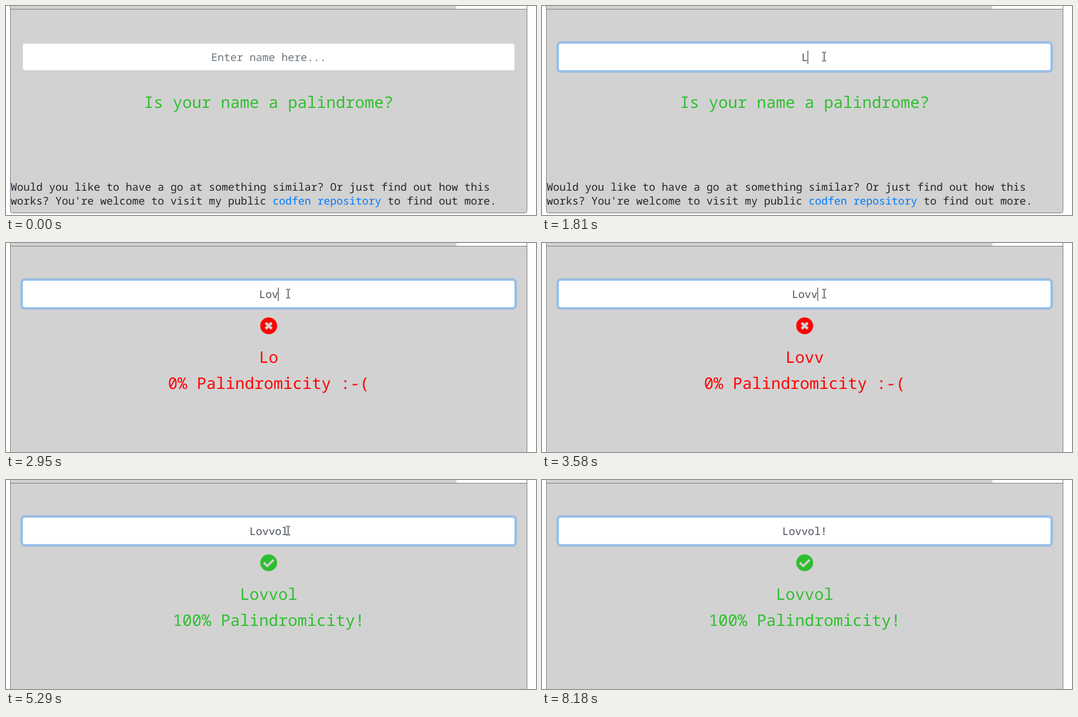
Write an HTML page that moves like this. It is 912 by 361 pixels and loops after 8250 ms.

```html
<!DOCTYPE html>
<html lang="en">
<head>
<meta charset="utf-8">
<title>Palindrome checker</title>
<style>
  html, body { margin: 0; width: 100%; height: 100%; overflow: hidden; background: #fff; }
  svg { display: block; width: 912px; height: 361px; }
  text { font-family: "Noto Sans Mono", monospace; font-size: 18.33px; text-rendering: geometricPrecision; fill: #212529; }
  .middle { text-anchor: middle; }
  .large { font-size: 27.49px; }
  .good { fill: #2ebf2e; }
  .bad { fill: #f00; }
  .good text { fill: #2ebf2e; }
  .bad text { fill: #f00; }
</style>
</head>
<body>
<svg viewBox="0 0 912 361">
  <path id="card" fill="#d2d2d2" stroke="#7c7c7c"/>
  <path d="M775 0H896V5H775Z" fill="#fff"/>
  <path d="M7 5.5H897" stroke="#7c7c7c"/>

  <rect id="ring" fill="#007bff" fill-opacity=".25"/>
  <rect id="field" x="28.5" y="64.5" width="847" height="47" rx="4" fill="#fff"/>
  <text id="entry" class="middle" x="452" y="95"></text>
  <path id="caret" stroke="#222"/>

  <g id="intro">
    <text class="middle large good" x="452" y="176">Is your name a palindrome?</text>
    <text x="8" y="319">Would you like to have a go at something similar? Or just find out how this</text>
    <text x="8" y="343">works? You're welcome to visit my public <tspan fill="#007bff">codfen repository</tspan> to find out more.</text>
  </g>

  <g id="result">
    <g transform="translate(452 143)" fill="none" stroke="#d2d2d2">
      <circle id="disc" r="14.5" stroke="none"/>
      <path id="tick" d="M-8.4-.4L-2.3 5.7L8.4-5.1" stroke-width="3.7"/>
      <path id="cross" d="M-5.2-5.2L5.2 5.2M5.2-5.2L-5.2 5.2" stroke-width="4.6"/>
    </g>
    <text id="letters" class="middle large" x="452" y="207"></text>
    <text id="score" class="middle large" x="452" y="252"></text>
  </g>

  <path id="beam" d="M-3.5-7.5h3M.5-7.5h3M0-7V7M-3.5 7.5h3M.5 7.5h3" fill="none" stroke="#000"/>
  <path id="arrow" d="M.5.5V16.5L4.2 13L7 19L9.5 18L6.8 12H12Z" fill="#fff" stroke="#000"/>
</svg>
<script>
const LOOP = 8250;
const NAME = "Lovvol!";
const CENTER = 452, ADVANCE = 11;
const REST = [485, 87];

const typedAt = [1810, 2340, 2950, 3430, 3980, 4760, 6000];
const checkedAt = [1960, 2490, 3030, 3580, 4130, 4910];
const caretOn = [[780, 1240], [1810, 4590], [4760, 5290], [5840, 6610], [7080, 7630]];

const el = id => document.getElementById(id);
const show = (id, on) => el(id).setAttribute("display", on ? "inline" : "none");
const set = (id, attrs) => {
  for (const key in attrs) el(id).setAttribute(key, attrs[key]);
};
const countPast = (times, t) => times.filter(time => t >= time).length;

function drawField(t) {
  const count = countPast(typedAt, t);
  el("entry").textContent = count ? NAME.slice(0, count) : "Enter name here...";
  el("entry").style.fill = count ? "#495057" : "#6c757d";

  const focus = t < 780 ? 0 : t < 860 ? 0.65 : 1;
  const spread = 3.2 * focus;
  set("ring", {
    x: 28 - spread, y: 64 - spread, rx: 4.5 + spread,
    width: 848 + 2 * spread, height: 48 + 2 * spread
  });
  show("ring", focus > 0);
  set("field", { stroke: focus === 0 ? "#ced4da" : focus < 1 ? "#9cc5f2" : "#80bdff" });

  const x = Math.floor(CENTER + count * ADVANCE / 2) + 0.5;
  set("caret", { d: `M${x} 77V100` });
  show("caret", caretOn.some(([from, to]) => t >= from && t < to));
}

let checked = -1;
function drawResult(t) {
  const count = countPast(checkedAt, t);
  if (count === checked) return;
  checked = count;
  show("intro", !count);
  show("result", count);
  const bottom = count ? 370 : 357.5;
  set("card", { d: `M7.5-2V${bottom - 4}q0 4 4 4H892.5q4 0 4-4V-2Z` });
  if (!count) return;

  const letters = [...NAME.slice(0, count)];
  const matches = letters.map((c, i) => c.toLowerCase() === letters[count - 1 - i].toLowerCase());
  const percent = Math.round(100 * matches.filter(Boolean).length / count);
  const perfect = percent === 100;
  set("result", { class: perfect ? "good" : "bad" });
  set("disc", { class: perfect ? "good" : "bad" });
  show("tick", perfect);
  show("cross", !perfect);
  el("letters").innerHTML = letters
    .map((c, i) => `<tspan class="${matches[i] ? "good" : "bad"}">${c}</tspan>`).join("");
  el("score").textContent = `${percent}% Palindromicity${perfect ? "!" : " :-("}`;
}

function pointerAt(t) {
  if (t < 70 || t >= 7630) return null;
  if (t < 700) {
    const p = Math.floor((t - 70) / 79) / 8;
    const u = 1 - (1 - (1 - p) ** 1.5);
    const curve = (a, b, c) => u * u * a + 2 * u * (1 - u) * b + (1 - u) ** 2 * c;
    return [curve(636, 550, REST[0]), curve(201, 150, REST[1])];
  }
  if (t < 7400) return REST;
  return t < 7480 ? [536, 105] : t < 7550 ? [680, 156] : [897, 231];
}

function drawPointer(t) {
  const point = pointerAt(t);
  const [x, y] = (point || REST).map(Math.round);
  const overHeading = t < 1960 && y > 150 && y < 187 && x > 238 && x < 666;
  const isBeam = y < 112 || overHeading;
  show("beam", point && isBeam);
  show("arrow", point && !isBeam);
  set("beam", { transform: `translate(${x + 0.5} ${y + 0.5})` });
  set("arrow", { transform: `translate(${x} ${y})` });
}

const start = performance.now();
function draw() {
  const t = (performance.now() - start) % LOOP;
  drawField(t);
  drawResult(t);
  drawPointer(t);
  requestAnimationFrame(draw);
}
draw();
</script>
</body>
</html>
```
